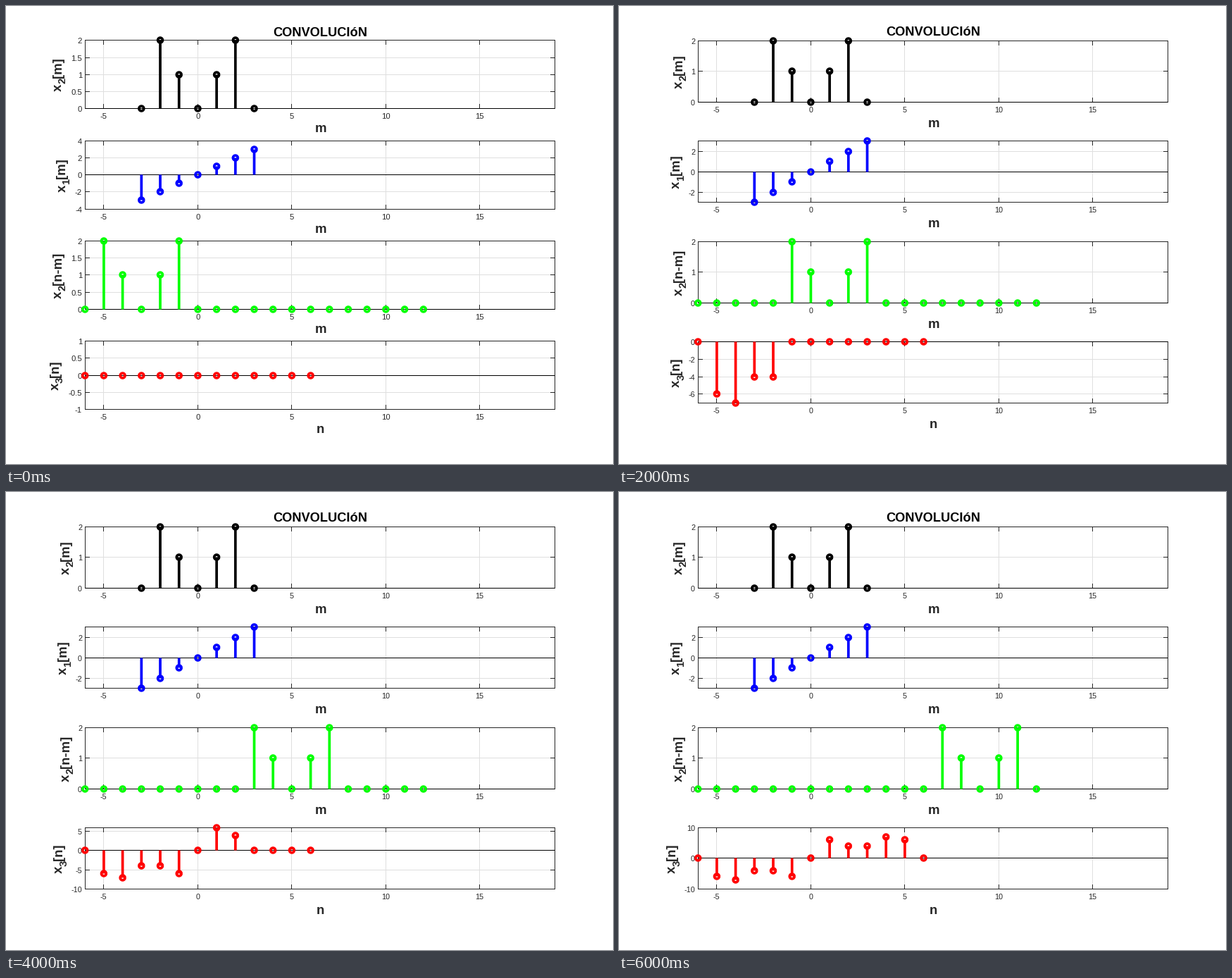
Write a matplotlib script that moves like this. It is 862 px wide and 650 px high and loops after 6500 ms.

```python
import numpy as np
import matplotlib.pyplot as plt
from matplotlib.animation import FuncAnimation
from matplotlib.collections import LineCollection

W, H, DPI = 862, 650, 64
PX = 72 / DPI                      # points per pixel
INK, GRID = "#262626", "#dfdfdf"
LEFT, RIGHT, UNIT = 112.2, 779.7, 26.7
X_TICKS = range(-5, 16, 5)
TICK_LEN = 6.5
LABEL_SIZE = 18.67
STEM, RADIUS = 3.7, 3.4

# Advance widths in em of the bold label glyphs
EM = {"x": .556, "[": .333, "]": .333, "m": .889, "n": .611, "-": .333}
DIGIT_EM, SUB_SCALE = .556, .8

plt.rcParams["font.family"] = "Liberation Sans"

SPAN = np.arange(-3, 4)
PULSE = np.array([0, 2, 1, 0, 1, 2, 0])
RAMP = SPAN
N = np.arange(-6, 7)
M = np.arange(-6, 13)
CONV = np.convolve(PULSE, RAMP)

turn = np.linspace(0, 2 * np.pi, 49)
RING = RADIUS * np.column_stack([np.cos(turn), np.sin(turn)])

fig = plt.figure(figsize=(W / DPI, H / DPI), dpi=DPI, facecolor="white")
ax = fig.add_axes([0, 0, 1, 1])


def px(m):
    return LEFT + UNIT * (np.asarray(m) + 6)


def mid(v):
    """Centre of the pixel that holds v."""
    return np.floor(v) + .5


def lines(segs, color, width=1.0, z=1):
    # Coordinates already sit on pixel centres, so snapping stays off.
    ax.add_collection(LineCollection(segs, colors=color, linewidths=width * PX,
                                     zorder=z, snap=False, capstyle="butt"),
                      autolim=False)


def text(x, y, s, size, color=INK, **kw):
    kw.setdefault("ha", "center")
    ax.text(x, y, s, fontsize=size * PX, color=color, va="baseline",
            zorder=3, **kw)


def side_label(x, yc, sub, rest):
    """Upright label x_sub[rest], centred on yc and read from below."""
    widths = [EM["x"], DIGIT_EM * SUB_SCALE, sum(EM[c] for c in rest)]
    y = yc + sum(widths) * LABEL_SIZE / 2
    parts = [("x", 1, 0), (sub, SUB_SCALE, 6), (rest, 1, 0)]
    for (s, scale, drop), w in zip(parts, widths):
        text(x + drop, y, s, LABEL_SIZE * scale, weight="bold", ha="left",
             rotation=90, rotation_mode="anchor")
        y -= w * LABEL_SIZE


def panel(top, height, lim, ticks, xs, ys, color, sub, rest, xlabel, first):
    lo, hi = lim
    bottom = top + height
    size = 11.2 if first else 10.8

    def py(v):
        return bottom - (np.asarray(v) - lo) / (hi - lo) * height

    t, b, l, r = mid(top), mid(bottom), mid(LEFT), mid(RIGHT)
    gx = [mid(px(v)) for v in X_TICKS]
    gy = [mid(py(v)) for v in ticks]

    lines([[(x, t), (x, b)] for x in gx] + [[(l, y), (r, y)] for y in gy],
          GRID, z=1)
    frame = [[(l - .5, t), (r + .5, t)], [(l - .5, b), (r + .5, b)],
             [(l, t), (l, b)], [(r, t), (r, b)]]
    for x in gx:
        frame += [[(x, b), (x, b - TICK_LEN)], [(x, t), (x, t + TICK_LEN)]]
    for y in gy:
        frame += [[(l, y), (l + TICK_LEN, y)], [(r, y), (r - TICK_LEN, y)]]
    lines(frame, INK, z=2)

    for v, x in zip(X_TICKS, gx):
        text(x, b + 14.5, f"{v:g}", size)
    for v, y in zip(ticks, gy):
        text(108, y + 4.5, f"{v:g}", size, ha="right")

    em = {"-": .333, ".": .278}
    tick_w = max(sum(em.get(c, DIGIT_EM) for c in f"{v:g}") for v in ticks) * size
    side_label((94.4 if first else 95.9) - tick_w, (t + b) / 2, sub, rest)
    text(446.5, b + (33.5 if first else 35.5), xlabel, LABEL_SIZE,
         weight="bold")

    zero = mid(py(0))
    lines([[(l, zero), (r, zero)]], "black", z=4)
    points = np.column_stack([px(xs), mid(py(ys))])
    lines([[(x, zero), (x, y)] for (x, y), v in zip(points, ys) if v],
          color, STEM, z=5)
    lines([p + RING for p in points], color, STEM, z=6)


def result_axis(k):
    """Limits and ticks of the lowest panel after k steps."""
    if k == 0:
        return (-1, 1), np.arange(-1, 1.1, .5)
    if k == 1:
        return (-6, 0), range(-6, 1, 2)
    if k < 7:
        return (-7, 0), range(-6, 1, 2)
    if k < 10:
        return (-10, 6), range(-10, 6, 5)
    return (-10, 10), (-10, 0, 10)


def draw(k):
    ax.cla()
    ax.set_xlim(0, W)
    ax.set_ylim(H, 0)
    ax.axis("off")

    first = k == 0
    y0, height = (48.75, 97) if first else (49.45, 87)
    tops = y0 + 142.3 * np.arange(4)
    half = np.arange(0, 2.1, .5) if first else (0, 1, 2)
    ramp_axis = ((-4, 4), range(-4, 5, 2)) if first else ((-3, 3), (-2, 0, 2))

    shifted = np.zeros(len(M))
    shifted[k:k + 7] = PULSE[::-1]
    total = np.where(np.arange(len(N)) <= k, CONV, 0)

    text(446.5, 43 if first else 42, "CONVOLUCIóN", 18.3, "black",
         weight="bold")
    panel(tops[0], height, (0, 2), half, SPAN, PULSE, "black",
          "2", "[m]", "m", first)
    panel(tops[1], height, *ramp_axis, SPAN, RAMP, "blue",
          "1", "[m]", "m", first)
    panel(tops[2], height, (0, 2), half, M, shifted, "lime",
          "2", "[n-m]", "m", first)
    panel(tops[3], height, *result_axis(k), N, total, "red",
          "3", "[n]", "n", first)
    return []


anim = FuncAnimation(fig, draw, frames=13, interval=500, repeat=True,
                     repeat_delay=0, blit=False)
plt.show()
```
